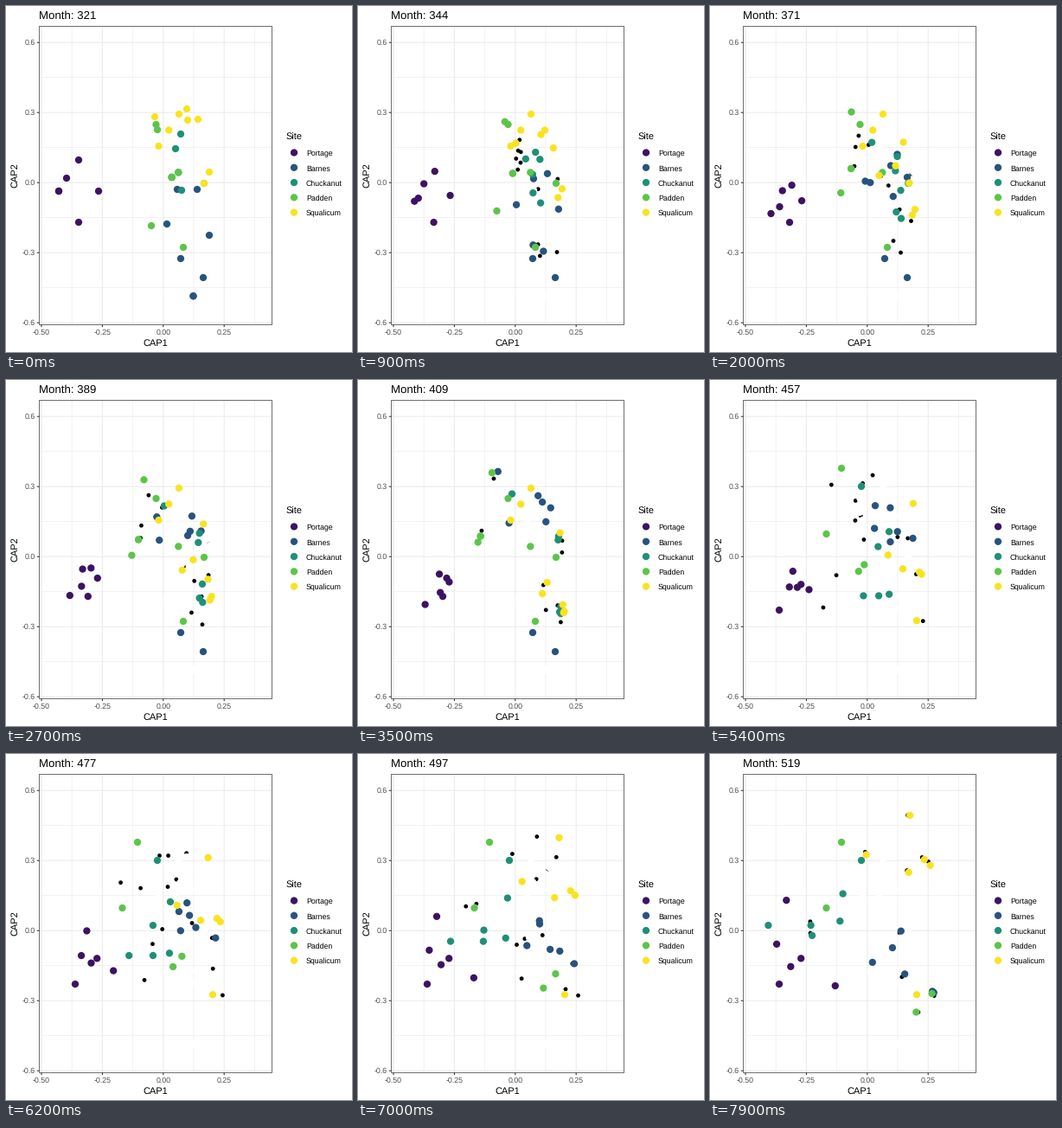
A matplotlib script that plays this animation: 400 px wide and 400 px high, repeating every 8 s.

```python
import numpy as np
import matplotlib.pyplot as plt
from matplotlib.animation import FuncAnimation

plt.rcParams["font.family"] = "Liberation Sans"
plt.rcParams["text.hinting"] = "none"

SIZE, DPI = 400, 100
FRAMES, STEP = 80, 40          # a new survey every STEP frames
PT = 72 / DPI                  # points per pixel
LEFT, RIGHT, TOP, BOTTOM = 38.5, 307.5, 23.5, 368.5
BIG, SMALL = 4.15, 2.4         # dot radii in pixels

COLORS = {"Portage": "#3c1361", "Barnes": "#28537f", "Chuckanut": "#1f8f78",
          "Padden": "#5cc549", "Squalicum": "#f9e31f"}


def ring(cx, cy, rx, ry, n):
    a = np.linspace(np.pi, -np.pi, n)
    return list(zip(cx + rx * np.cos(a), cy + ry * np.sin(a)))


def row(start, end, n):
    return [tuple(p) for p in np.linspace(start, end, n)]


# Places in stage pixels where several samples meet
HEART, KNOT, GATE, FOOT = (191.7, 198), (199.3, 192.4), (229, 205), (216.5, 335.3)
SE, EAST, WEST, RIM = (239, 278.2), (237, 183), (134.5, 178), (259.7, 279.5)
BAY, NECK = (100, 250.2), (105.2, 236.3)

# Samples of each survey, by site; their order decides who moves where
SURVEYS = [
    {
        "Portage": [(70, 199)] + ring(84, 214, 23, 36, 5),
        "Barnes": [(186, 252), (221, 212), (198, 212), (235, 265),
                   FOOT, FOOT, (202, 292), (228, 314)],
        "Chuckanut": [HEART, (196, 165), (203, 213), HEART, (202, 148), KNOT],
        "Padden": [HEART, (168, 254), (175, 143), HEART,
                   GATE, KNOT, (205, 279), (173.5, 137)],
        "Squalicum": [(209, 119), (235, 192), (210, 132), GATE, (172, 128),
                      (222, 131)] + row((200, 125), (176.5, 162), 3),
    },
    {
        "Portage": [(97.5, 228), BAY, BAY, NECK, NECK, (80, 266)],
        "Barnes": [(173, 153), (212, 131), (220, 157), (221, 131),
                   (207, 105), (154, 73)],
        "Chuckanut": [SE, EAST, SE, EAST, SE, (175, 123)],
        "Padden": [WEST, WEST, (152, 102), WEST],
        "Squalicum": [(220, 250.5), SE, EAST, SE, (219, 264), SE],
    },
    {
        "Portage": [(146, 269), (76.5, 219), (88, 167), (93, 246)],
        "Barnes": [(222, 206), (225.5, 257.5), (187, 243), RIM, (211, 227), RIM],
        "Chuckanut": [(113.5, 196), (115, 210.5), (63, 196), (151.5, 161), (148, 191)],
        "Padden": [(241, 301.5), RIM],
        "Squalicum": [(179.5, 113), (248, 118), (231, 68), (255, 125), (230, 133.5)],
    },
]

fig = plt.figure(figsize=(SIZE / DPI, SIZE / DPI), dpi=DPI, facecolor="white")
ax = fig.add_axes([0, 0, 1, 1])
ax.set_xlim(0, SIZE)
ax.set_ylim(SIZE, 0)
ax.axis("off")


def px(x):
    return 181.8 + 281.6 * x


def py(y):
    return 204.2 - 270 * y


def line(xs, ys, color, width, z=1):
    ax.plot(xs, ys, color=color, lw=width * PT, zorder=z,
            solid_capstyle="butt", snap=False)


def label(x, y, text, size, color="black", **kw):
    return ax.text(x, y, text, fontsize=size * PT, color=color,
                   va="baseline", **kw)


# grid, ticks and border
for x in np.arange(-0.375, 0.4, 0.25):
    line([px(x)] * 2, [TOP, BOTTOM], "#ebebeb", 0.6)
for y in np.arange(-0.45, 0.5, 0.3):
    line([LEFT, RIGHT], [py(y)] * 2, "#ebebeb", 0.6)
for x in (-0.5, -0.25, 0, 0.25):
    line([px(x)] * 2, [TOP, BOTTOM], "#ebebeb", 1.07)
    line([px(x)] * 2, [BOTTOM, BOTTOM + 2.7], "#333333", 1.07)
    label(px(x), 380, f"{x:.2f}", 8.8, "#4d4d4d", ha="center")
for y in (-0.6, -0.3, 0, 0.3, 0.6):
    line([LEFT, RIGHT], [py(y)] * 2, "#ebebeb", 1.07)
    line([LEFT - 2.7, LEFT], [py(y)] * 2, "#333333", 1.07)
    label(34, py(y) + 3.1, f"{y:.1f}", 8.8, "#4d4d4d", ha="right")
line([LEFT, RIGHT, RIGHT, LEFT, LEFT], [TOP, TOP, BOTTOM, BOTTOM, TOP],
     "#333333", 0.7, 9)

# titles and legend
title = label(38.5, 15, "", 13.2)
label(173, 393, "CAP1", 11, ha="center")
label(13, 196, "CAP2", 11, ha="center", rotation=90, rotation_mode="anchor")
label(324, 155, "Site", 11)
keys = [(333, 169.5 + 17.28 * k) for k in range(len(COLORS))]
for name, (_, y) in zip(COLORS, keys):
    label(347, y + 3.7, name, 8.8)

dots = ax.scatter([], [], linewidths=0, zorder=3)


def pooled(survey):
    return sum(survey.values(), [])


def move(start, end, t):
    """Pair points by order; those without a partner stay."""
    pts = np.array(start, float)
    n = min(len(start), len(end))
    pts[:n] += t * (np.array(end[:n]) - pts[:n])
    return pts, n


def update(i):
    leg, t = i // STEP, i % STEP / STEP
    now, then = SURVEYS[leg:leg + 2]
    title.set_text(f"Month: {round(321.35 + 2.506 * i)}")

    # black dots pair across all sites; white marks cover every past survey
    pts, n = move(pooled(now), pooled(then), t)
    past = sum(map(pooled, SURVEYS[:leg + 1]), [])
    layers = [(pts[:n], "black", SMALL), (past, "white", BIG)]
    for (name, color), key in zip(COLORS.items(), keys):
        layers.append((move(now[name], then[name], t)[0], color, BIG))
        layers.append(([key], color, BIG))

    dots.set_offsets(np.vstack([p for p, _, _ in layers]))
    dots.set_facecolor([c for p, c, _ in layers for _ in p])
    dots.set_sizes([(2 * r * PT) ** 2 for p, _, r in layers for _ in p])
    return [title, dots]


anim = FuncAnimation(fig, update, frames=FRAMES, interval=100,
                     init_func=lambda: update(0), repeat=True, repeat_delay=0)
plt.show()
```
